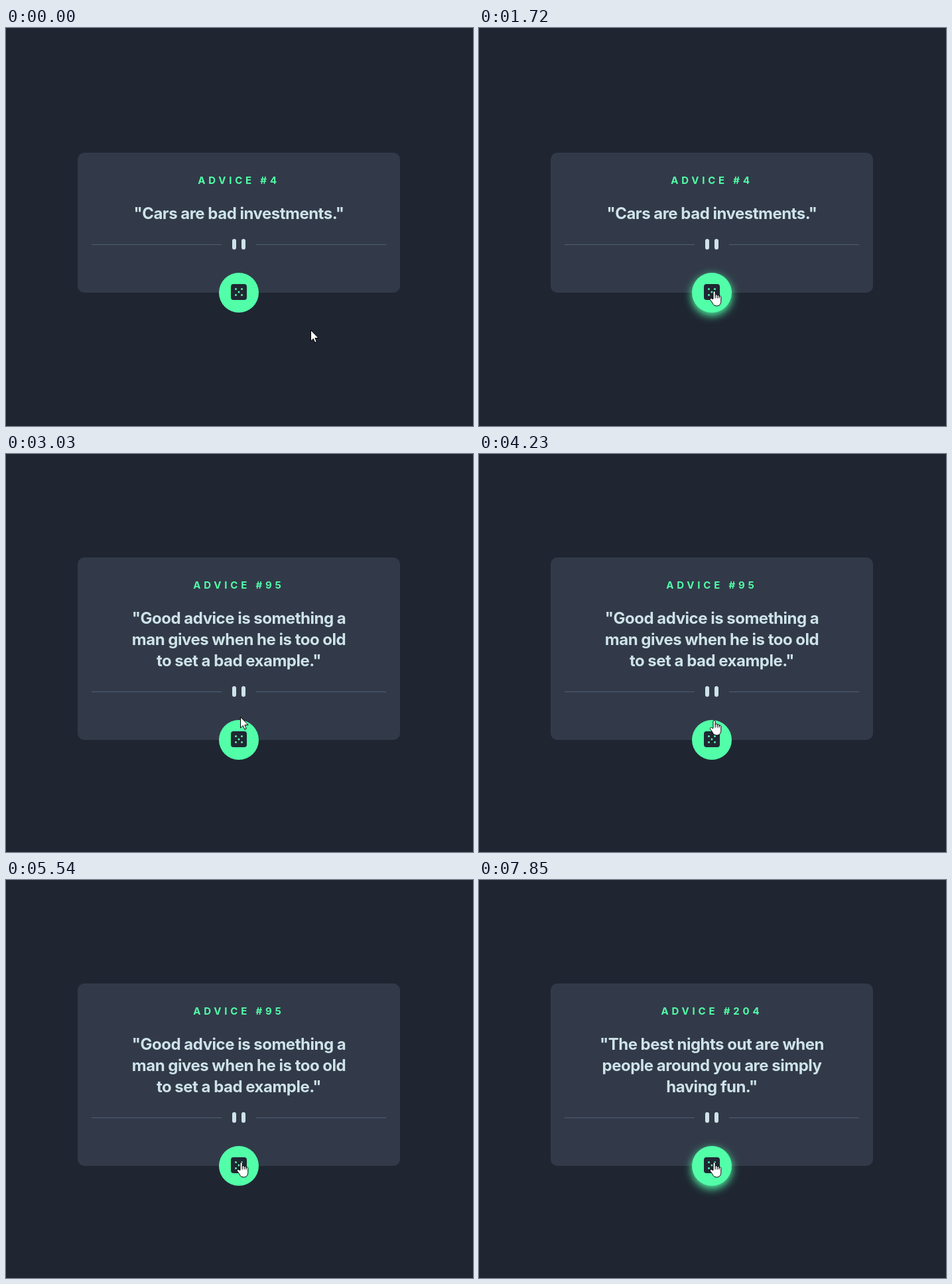
An HTML page for the animation above (8000 ms loop, 704 by 600 pixels).

```html
<!DOCTYPE html>
<html lang="en">
<head>
<meta charset="utf-8">
<title>Advice generator</title>
<style>
  html, body { margin: 0; width: 100%; height: 100%; overflow: hidden; background: #1f2632; }
  svg { display: block; width: 704px; height: 600px; }
  text { font-family: Inter, "Open Sans", sans-serif; font-weight: 700; font-optical-sizing: none; text-anchor: middle; }
  #title { font-size: 15px; letter-spacing: 4.8px; fill: #52ffa8; }
  #quote { font-size: 24px; letter-spacing: -0.5px; fill: #cee3e9; }
  #glow { filter: blur(6.5px); }
  .cursor { fill: #fff; stroke: #000; stroke-width: 1; stroke-linejoin: round; }
</style>
</head>
<body>
<svg viewBox="0 0 704 600">
  <rect id="card" x="108" width="486" rx="10" fill="#323a49"/>
  <g id="head">
    <text id="title" x="351" y="46.5"></text>
    <text id="quote" x="351"></text>
  </g>
  <g id="foot">
    <path d="M129 -73h196v1h-196zM377 -73h196v1h-196z" fill="#4f5d74"/>
    <g fill="#cee3e9">
      <rect x="341" y="-81" width="6" height="16" rx="3"/>
      <rect x="355" y="-81" width="6" height="16" rx="3"/>
    </g>
    <circle id="glow" cx="351" cy="4" r="30" fill="#52ffa8"/>
    <circle cx="351" r="30" fill="#52ffa8"/>
    <g transform="translate(339 -13)">
      <rect width="24" height="24" rx="4" fill="#202733"/>
      <g fill="#52ffa8">
        <circle cx="7.5" cy="7.5" r="1.5"/><circle cx="16.5" cy="7.5" r="1.5"/>
        <circle cx="12" cy="12" r="1.5"/>
        <circle cx="7.5" cy="16.5" r="1.5"/><circle cx="16.5" cy="16.5" r="1.5"/>
      </g>
    </g>
  </g>
  <path id="arrow" class="cursor" d="M0 0V16.5L3.8 13 6.2 18.6 8.8 17.5 6.4 12H11.6Z"/>
  <g id="hand" class="cursor">
    <g transform="translate(-6 -.5)">
      <path d="M5.5 12.5V2.2a1.6 1.6 0 0 1 3.2 0V7.2a1.5 1.5 0 0 1 3 0V8.1a1.4 1.4 0 0 1 2.8 0V9.4a1.4 1.4 0 0 1 2.8 0V15.5c0 5-2.6 7.5-6.4 7.5-3.8 0-5-1.6-6.4-4.5L1.2 13.9c-1-2 .9-3.4 2.5-1.8z"/>
      <path d="M8.7 7v4.5M11.7 8v3.5M14.5 9v2.5" fill="none"/>
    </g>
  </g>
</svg>
<script>
const LOOP = 8000, FADE = 280;
const $ = id => document.getElementById(id);

const cards = [
  { at: 0, top: 188, bottom: 399, title: 'ADVICE #4', lines: ['"Cars are bad investments."'] },
  { at: 2050, top: 156, bottom: 431, title: 'ADVICE #95',
    lines: ['"Good advice is something a', 'man gives when he is too old', 'to set a bad example."'] },
  { at: 6070, top: 156, bottom: 431, title: 'ADVICE #204',
    lines: ['"The best nights out are when', 'people around you are simply', 'having fun."'] }
];
const moves = [
  { start: 70, end: 740, from: [459, 455], to: [353, 396] },
  { start: 4090, end: 4640, from: [353, 396], to: [353, 425] }
];
const hovers = [[540, 2050], [4220, LOOP + FADE]];
const presses = [[1520, 1720], [5540, 5740], [7720, 7850]];

const clamp = v => Math.min(1, Math.max(0, v));
const ease = v => v * v * (3 - 2 * v);
const within = (t, [a, b]) => t >= a && t < b;
const move = (el, x, y) => el.setAttribute('transform', `translate(${x} ${y})`);
const show = (el, on) => el.setAttribute('visibility', on ? 'visible' : 'hidden');

let shown;
function setCard(card) {
  if (card === shown) return;
  shown = card;
  $('card').setAttribute('y', card.top);
  $('card').setAttribute('height', card.bottom - card.top);
  move($('head'), 0, card.top);
  move($('foot'), 0, card.bottom);
  $('title').textContent = card.title;
  $('quote').replaceChildren(...card.lines.map((line, i) => {
    const span = document.createElementNS('http://www.w3.org/2000/svg', 'tspan');
    span.setAttribute('x', 351);
    span.setAttribute('y', 99.7 + 32 * i);
    span.textContent = line;
    return span;
  }));
}

function pointer(t) {
  const m = moves.findLast(m => t >= m.start) || moves[0];
  const k = ease(clamp((t - m.start) / (m.end - m.start)));
  return m.from.map((v, i) => Math.round(v + (m.to[i] - v) * k));
}

function glowLevel(t) {
  if (presses.some(p => within(t, p))) return 0;
  return Math.max(...hovers.map(([a, b]) =>
    ease(clamp((t - a) / FADE)) * ease(clamp(1 - (t - b) / FADE))));
}

function draw(t) {
  setCard(cards.findLast(c => t >= c.at));
  $('glow').setAttribute('opacity', glowLevel(t));
  const hovering = hovers.some(h => within(t, h));
  const [x, y] = pointer(t);
  for (const id of ['arrow', 'hand']) move($(id), x + 0.5, y + 0.5);
  show($('hand'), hovering);
  show($('arrow'), !hovering);
}

const begin = performance.now();
function frame() {
  draw((performance.now() - begin) % LOOP);
  requestAnimationFrame(frame);
}
frame();
</script>
</body>
</html>
```
